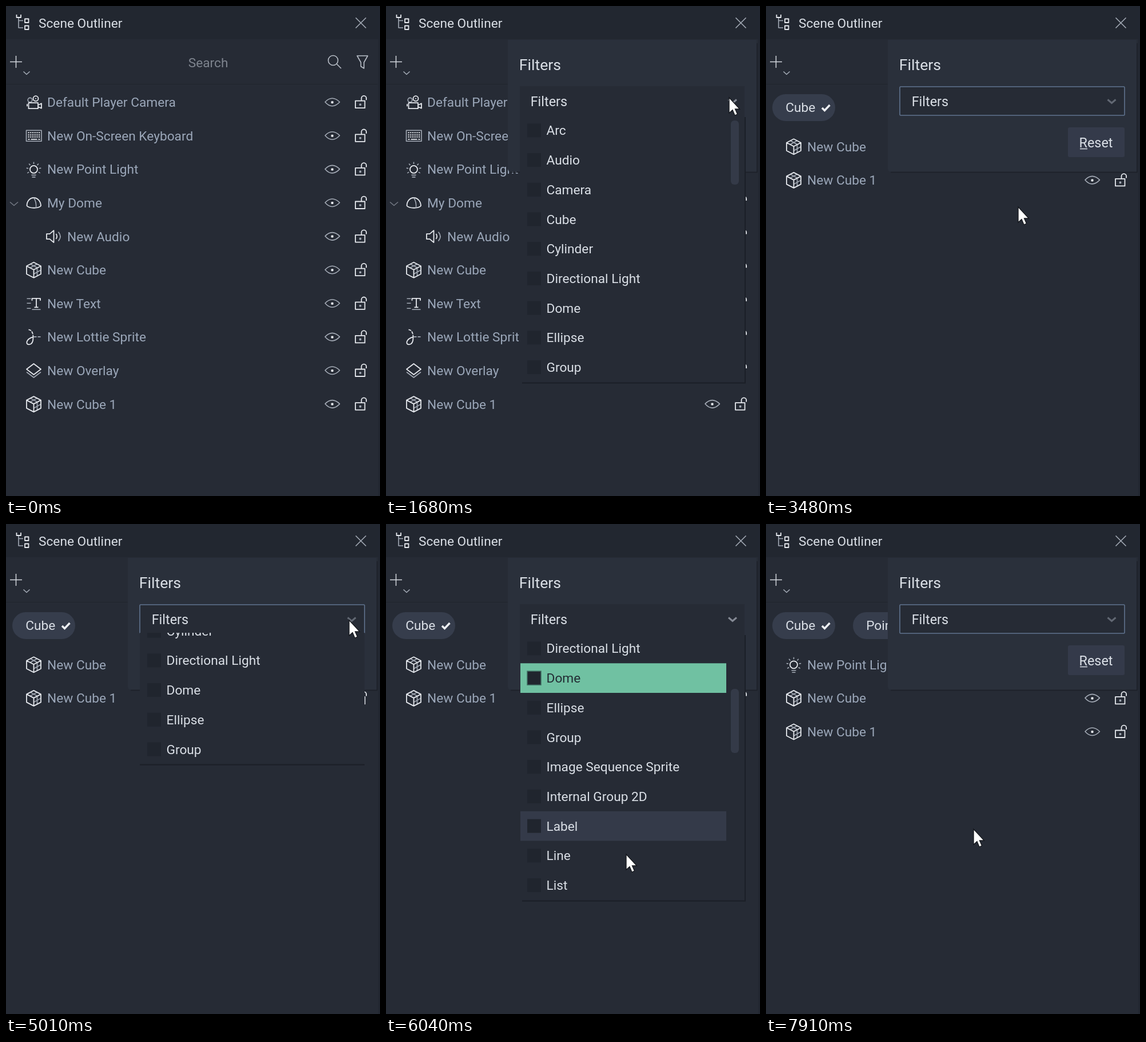
Recreate the animation shown at these times as an HTML page. Size 654 px wide and 856 px high, loop 8 s.

```html
<!DOCTYPE html>
<html lang="en">
<head>
<meta charset="utf-8">
<title>Scene Outliner</title>
<style>
  html, body { margin: 0; width: 100%; height: 100%; overflow: hidden; background: #262b35; }
  svg { display: block; width: 654px; height: 856px; }
  text { font: 22.7px Roboto, sans-serif; fill: #dadfe6; }
  .item text { fill: #9ba7b9; }
  .field { font-size: 23.4px; }
  .icon, .line { fill: none; stroke: #e6e9ee; stroke-width: 1.8; stroke-linejoin: round; }
  .dim { stroke: #a4abb6; stroke-width: 1.6; }
  .solid { fill: #e6e9ee; stroke: none; }
  .box { fill: #20252e; }
  .row .back { fill: none; }
  .row .tick { display: none; }
  .row.picked .tick { display: inline; }
  .row.hover .back { fill: #343a49; }
  .row.current .back { fill: #70c1a2; }
  .row.current text { fill: #222c33; }
  .row.current .box { stroke: #3f6c62; stroke-width: 1.5; }
</style>
</head>
<body>
<svg viewBox="0 0 654 856" xmlns="http://www.w3.org/2000/svg">
  <defs>
    <clipPath id="below"><rect x="230" y="190" width="400" height="472"/></clipPath>
    <clipPath id="rows"><rect x="234" y="192" width="393" height="466"/></clipPath>
  </defs>

  <rect width="654" height="856" fill="#262b35"/>
  <rect width="654" height="58" fill="#222730"/>
  <path d="M0 136.5H650" stroke="#20252d"/>
  <path d="M652.5 0V856" stroke="#222731" stroke-width="3"/>

  <g class="line">
    <path class="dim" d="M22 20v18h8M22 25.5h8"/>
    <path d="M18.5 15v5H26v-5M33 22.5h6.5V29H33zM33 34.5h6.5V41H33z"/>
    <path class="dim" d="M611.5 20.5l18 18M629.5 20.5l-18 18"/>
    <path d="M7 97.500h21M17.500 87v21" style="stroke:#d3d7dd;stroke-width:1.5"/>
    <path class="dim" d="M30.500 114.500l5.500 5 5.500-5"/>
  </g>
  <text x="57" y="37.5">Scene Outliner</text>
  <text x="318.7" y="106.5" style="fill:#7e848e">Search</text>
  <g class="line dim" style="stroke:#b8bec7">
    <circle cx="572" cy="95" r="8.5"/>
    <path d="M578 101l8 8M614 87h18.500l-6.500 11.500v10.500l-5.500-3.500v-7z"/>
  </g>

  <g id="lists"></g>

  <g id="popup">
    <path d="M213 59H648V289.500H219Q213 289.500 213 284Z" fill="#2a303b"/>
    <path d="M649 65V290.500H218" fill="none" stroke="#1c2028" stroke-width="1.6"/>
    <text x="232.7" y="112" style="font-size:26.7px">Filters</text>
    <rect x="528" y="212" width="99" height="52" rx="3" fill="#343a4a"/>
    <text class="field" x="547.5" y="247">Reset</text>
    <path d="M549 249.5h13" stroke="#dadfe6" stroke-width="1.5"/>
    <g id="closedField">
      <rect x="234" y="141" width="393" height="50" rx="1.5" fill="#262b35" stroke="#60738f" stroke-width="1.6"/>
      <text class="field" x="254.7" y="174.5">Filters</text>
      <path d="M597.500 163.500l7 6 7-6" fill="none" stroke="#626873" stroke-width="3"/>
    </g>
    <g id="openField">
      <rect x="234" y="140" width="393" height="53" fill="#262b35"/>
      <text class="field" x="252.7" y="174.5">Filters</text>
      <path d="M599 163.500l7 6 7-6" fill="none" stroke="#858a95" stroke-width="3"/>
    </g>
    <g clip-path="url(#below)">
      <g id="menu">
        <rect x="234" y="190" width="393" height="468" fill="#262b35"/>
        <path id="menuEdge" fill="none" stroke="#1b1f27" stroke-width="2"/>
        <g clip-path="url(#rows)"><g id="options"></g></g>
        <rect id="thumb" x="603" y="200" width="14" height="112" rx="6" fill="#343a48"/>
      </g>
    </g>
  </g>

  <path id="cursor" d="M0 0V27L6 21.500 10 31 14.500 29 10.500 20H18.500Z" fill="#fff" stroke="#14171c" stroke-width="1.3"/>
</svg>

<script>
const LOOP = 8000, ROW = 51.7, ITEM = 58.6;
const $ = id => document.getElementById(id);
const path = (d, cls = '') => `<path class="${cls}" d="${d}"/>`;
const circle = (x, y, r, cls = '') => `<circle class="${cls}" cx="${x}" cy="${y}" r="${r}"/>`;

const rays = Array.from({ length: 7 }, (_, i) => {
  const a = (150 + i * 40) * Math.PI / 180, c = Math.cos(a), s = Math.sin(a);
  return `M${c * 9.5} ${s * 9.5}L${c * 13} ${s * 13}`;
}).join('');

// Icons are drawn around their own centre.
const icons = {
  camera: circle(-6.5, -4, 3.8, 'dim') + circle(3.5, -6.5, 4.5) + circle(3.5, -6.5, 1, 'solid') +
    path('M-9 1H7.500V11H-9zM7.500 5L13.500 2V10.500L7.500 8M-11.500 3v4'),
  keyboard: path('M-13-9.500H13.500V9.500H-13z', 'dim') +
    '<path d="M-10-5.500H11M-10-1.500H11M-10 2H11" stroke-dasharray="2.2 1.5" stroke-width="2"/>' +
    path('M-10 6h3M-5 6H6M8 6h3'),
  light: circle(0, 0, 6.5) + path(rays + 'M-4 10H4M-3 13.500H3', 'dim'),
  dome: path('M-12 5C-12-4-6-9 0-9S12-4 12.500 5C9 10-8 10-12 5Z') + path('M0-9Q5-2 4 8.500', 'dim'),
  audio: path('M-12.500-4.500H-7L0-10.500V10.500L-7 4.500H-12.500Z') +
    path('M4-4.500Q7 0 4 4.500') + path('M8-8Q15 0 8 8', 'dim'),
  cube: path('M6-10.500L-6-4M-6-10.500L6-4M6-4V11M0 7L12.500 0', 'dim') +
    path('M0-13.500L12.500-7V7L0 13.500-12.500 7V-7ZM-12.500-7L0-.5 12.500-7M0-.5V13.500'),
  text: path('M-12-8.500h7M-12-.5h7M-12 8.500h7M-3 10.500H12', 'dim') +
    path('M-3-5V-9H11.500V-5M4.500-9V6M1 6.500H8'),
  sprite: path('M-1 1Q-1 12-8 13-13 13-12 8-10 2 0-.5') +
    '<path d="M-9-13Q-1-12-1 1" stroke-dasharray="5 1.5"/>' +
    '<path class="dim" d="M0-.5H14" stroke-dasharray="5 2"/>',
  overlay: path('M0-12L12.500-2.500 0 7-12.500-2.500Z') + path('M-12.500 2.500L0 12 12.500 2.500', 'dim'),
};

const tools = `<g class="icon">
  ${path('M558-.5Q564-7 570.500-7T583.500-.5Q577 6.500 570.500 6.500T558-.5Z', 'dim')}
  <rect class="solid" x="568.5" y="-2" width="4" height="4" rx="1"/>
  ${path('M611-2.500H627.500V10H611ZM621.500-2.500V-7A4.300 4.300 0 0 1 630.100-7V-4')}
  <rect class="dim" x="618.5" y="3" width="2" height="2"/></g>`;

const item = (icon, name, y, indent = 0) => `<g class="item" transform="translate(0 ${y})">
  <g class="icon" transform="translate(${48.5 + indent} 0)">${icons[icon]}</g>
  <text x="${72 + indent}" y="8">${name}</text>${tools}</g>`;

const chip = (name, x, width) => `<rect x="${x}" y="154" width="${width}" height="47" rx="23.5" fill="#363d4c"/>
  <text x="${x + 23.2}" y="185">${name}</text>
  <path d="M${x + width - 23} 178l4.500 4.500 9-9.500" fill="none" stroke="#eef0f4" stroke-width="3.5"/>`;

const stack = (entries, top) =>
  entries.map(([icon, name, indent], i) => item(icon, name, top + i * ITEM, indent)).join('');

const cubes = [['cube', 'New Cube'], ['cube', 'New Cube 1']];
const bulb = ['light', 'New Point Light'];
const everything = [
  ['camera', 'Default Player Camera'], ['keyboard', 'New On-Screen Keyboard'], bulb,
  ['dome', 'My Dome'], ['audio', 'New Audio', 35], cubes[0], ['text', 'New Text'],
  ['sprite', 'New Lottie Sprite'], ['overlay', 'New Overlay'], cubes[1],
];
const views = [
  stack(everything, 168.2) + '<path class="line dim" style="stroke:#747a85" d="M7 342.500l7 6 7-6"/>',
  chip('Cube', 11, 110) + stack(cubes, 245.8),
  chip('Cube', 11, 110) + chip('Point Light', 152, 176) + stack([bulb, ...cubes], 245.8),
];
$('lists').innerHTML = views.map(v => `<g>${v}</g>`).join('');

const names = ['Arc', 'Audio', 'Camera', 'Cube', 'Cylinder', 'Directional Light', 'Dome', 'Ellipse',
  'Group', 'Image Sequence Sprite', 'Internal Group 2D', 'Label', 'Line', 'List', 'Lottie Sprite', 'Mesh',
  'On-Screen Keyboard', 'Overlay', 'Pie', 'Plane', 'Point Light', 'Rectangle'];
$('options').innerHTML = names.map((name, i) => `<g class="row" transform="translate(0 ${217.4 + i * ROW})">
  <rect class="back" x="235" y="-25.8" width="360" height="${ROW}"/>
  <rect class="box" x="247" y="-12" width="24" height="24"/>
  <path class="line tick" d="M252 0l5 5 9-10" stroke-width="3"/>
  <text x="280.5" y="8">${name}</text></g>`).join('');
const rows = [...$('options').children];

// Each track holds [start in ms, value, ...]; values hold until the next entry.
const pointer = [
  [210, 577, 327], [420, 607, 205], [630, 622, 100], [1030, 599, 155], [1480, 600, 160],
  [1880, 580, 250], [2070, 540, 330], [2270, 505, 385], [2470, 495, 404], [2680, 465, 376],
  [2880, 441, 351], [3880, 460, 330], [4070, 510, 278], [4260, 560, 215], [4440, 590, 180],
  [4620, 600, 170], [4810, 600, 168], [5220, 590, 215], [5420, 520, 380], [5630, 450, 490],
  [5830, 425, 535], [6040, 420, 577], [6270, 419, 588], [6690, 418, 596], [7720, 390, 565], [7910, 363, 533],
];
const SHUT = 0, SLIDING = 1, OPEN = 2;
const menuState = [[0, SHUT], [1480, SLIDING], [1680, OPEN], [3270, SLIDING], [3470, SHUT],
  [5010, SLIDING], [5220, OPEN], [7540, SLIDING], [7720, SHUT]];
const scrolled = [[0, 0, 0], [6040, 5, 88], [6270, 8, 132], [6480, 11, 176], [6690, 13, 205]];
const current = [[0, -1], [1880, 1], [2070, 2], [2270, 3], [2470, 4], [2680, 3], [3270, -1],
  [5220, 0], [5420, 3], [5630, 5], [5830, 6], [7140, 20], [7540, -1]];
const hovered = [[0, -1], [6040, 11], [6270, 15], [6480, 18], [6690, 20], [7540, -1]];
const view = [[0, 0], [3080, 1], [7350, 2]];
const picks = [[0], [3080, 3], [7140, 3, 20]];

const at = (track, t) => (track.findLast(entry => entry[0] <= t) || []).slice(1);
const show = (el, on) => el.setAttribute('visibility', on ? 'inherit' : 'hidden');
const move = (el, x, y) => el.setAttribute('transform', `translate(${x} ${y})`);

function render(t) {
  const [x, y] = at(pointer, t);
  show($('cursor'), x !== undefined);
  if (x !== undefined) move($('cursor'), x, y);

  const [state] = at(menuState, t);
  show($('popup'), t >= 830);
  show($('closedField'), state !== OPEN);
  show($('openField'), state === OPEN);
  show($('menu'), state !== SHUT);
  move($('menu'), 0, state === SLIDING ? -237.5 : 0);
  $('menuEdge').setAttribute('d', state === OPEN ? 'M238 658.500H628V194' : 'M234 658H627');

  const [offset, thumb] = at(scrolled, t);
  move($('options'), 0, -offset * ROW);
  move($('thumb'), 0, thumb);

  const [active] = at(current, t), [over] = at(hovered, t), picked = at(picks, t);
  rows.forEach((row, i) => {
    row.classList.toggle('current', i === active);
    row.classList.toggle('hover', i === over);
    row.classList.toggle('picked', picked.includes(i));
  });

  const [shown] = at(view, t);
  [...$('lists').children].forEach((list, i) => show(list, i === shown));
}

const start = performance.now();
function tick() {
  render((performance.now() - start) % LOOP);
  requestAnimationFrame(tick);
}
tick();
</script>
</body>
</html>
```
